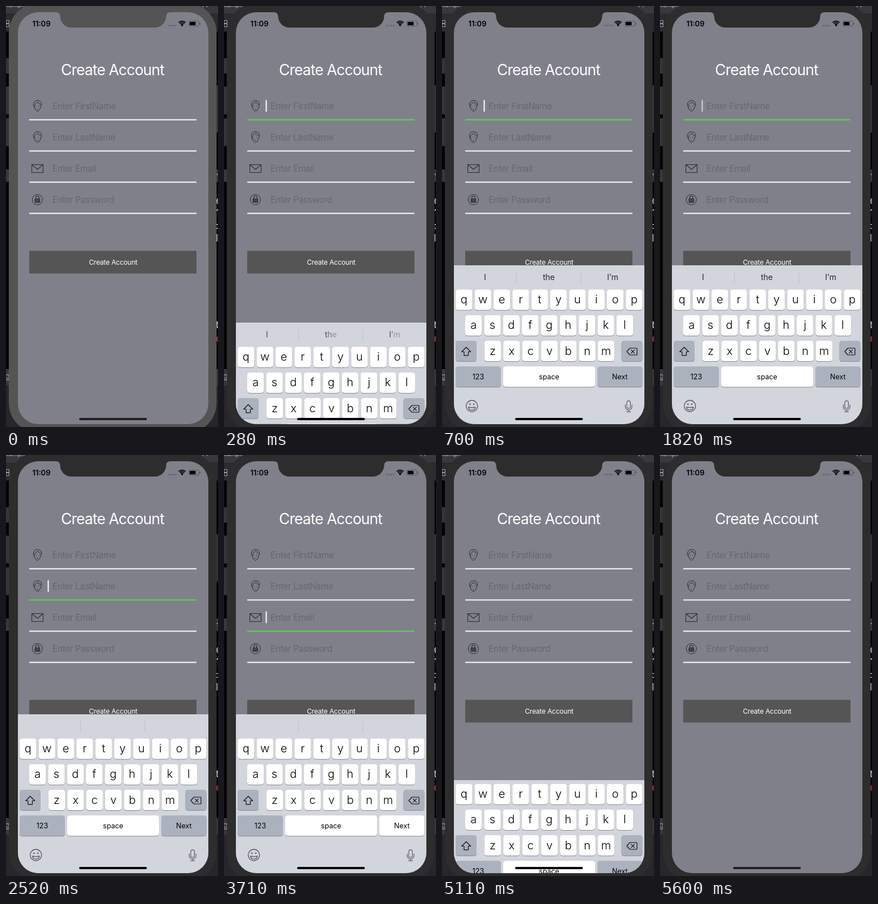
These frames come from a looping animation (374x742 px, 5740 ms). An HTML page with a canvas:

```html
<!DOCTYPE html>
<html lang="en">
<head>
<meta charset="utf-8">
<title>Create Account</title>
<style>
  html, body { margin: 0; width: 100%; height: 100%; overflow: hidden; background: #000; }
  canvas { display: block; width: 374px; height: 742px; }
</style>
</head>
<body>
<canvas id="stage" width="374" height="742"></canvas>
<script>
const ctx = document.getElementById('stage').getContext('2d');
const LOOP = 5740, STEP = 70;
const FONT = 'Inter, Roboto, sans-serif';
const INK = '#2b2b2e', KEY = '#ffffff', KEY_GREY = '#abb2be', PANEL = '#d3d5dd';
const FIELDS = ['Enter FirstName', 'Enter LastName', 'Enter Email', 'Enter Password'];
const clamp = v => Math.max(0, Math.min(1, v));

// Critically damped spring, as used by the system keyboard
function spring(ms) {
  const x = Math.max(0, ms) * 0.01826;
  return 1 - (1 + x) * Math.exp(-x);
}

function rect(x, y, w, h, color) {
  ctx.fillStyle = color;
  ctx.fillRect(x, y, w, h);
}

function round(x, y, w, h, r, color) {
  ctx.beginPath();
  ctx.roundRect(x, y, w, h, r);
  ctx.fillStyle = color;
  ctx.fill();
}

function dot(x, y, r, color) {
  ctx.beginPath();
  ctx.arc(x, y, r, 0, Math.PI * 2);
  ctx.fillStyle = color;
  ctx.fill();
}

function text(str, x, y, size, color, align = 'center', spacing = 0, weight = 400) {
  ctx.font = `${weight} ${size}px ${FONT}`;
  ctx.letterSpacing = spacing + 'px';
  ctx.textAlign = align;
  ctx.fillStyle = color;
  ctx.fillText(str, x, y);
}

function line(d, color, width = 1, dx = 0, dy = 0) {
  ctx.save();
  ctx.translate(dx, dy);
  ctx.strokeStyle = color;
  ctx.lineWidth = width;
  ctx.lineJoin = ctx.lineCap = 'round';
  ctx.stroke(new Path2D(d));
  ctx.restore();
}

function desktop() {
  rect(0, 0, 374, 742, '#020203');
  rect(0, 0, 374, 13, '#39393d');
  rect(0, 13, 374, 32, '#2c2c2f');
  text('xample', -1, 2, 11, '#c8c8c8', 'left');
  text('f P', 346, 2, 11, '#c8c8c8', 'left');
  for (const y of [25, 31]) line('M0 0h5v5h-5z', '#a0a0a0', 1, 0.5, y + 0.5);
  for (const [y, h] of [[92, 27], [142, 49], [198, 49]]) rect(0, y, 6, h, '#353537');
  rect(370, 140, 4, 83, '#353537');
  rect(0, 288, 374, 22, '#38383c');
  rect(0, 640, 374, 29, '#38383c');
  rect(0, 669, 374, 73, '#26262b');
  line('M0 650h5v9h-5M0 654l3 3', '#b8b8b8');
  rect(371, 296, 3, 2, '#39a5c4');
  [['e', 349], ['1', 371], [':', 393], ['l', 415], ['t', 568]].forEach(([c, y]) =>
    text(c, 370, y, 17, '#e6e6e6', 'left'));
  text('e', 370, 592, 17, '#d8434b', 'left');
}

function statusBar() {
  text('11:09', 62.5, 35.6, 13, '#000', 'center', 0, 600);
  for (let i = 0; i < 4; i++) dot(287.5 + i * 4, 34.5, 1.2, '#5c5c64');
  for (const r of [2.8, 5.7, 8.6]) {
    ctx.beginPath();
    ctx.arc(310.7, 35.2, r, -Math.PI * 0.75, -Math.PI * 0.25);
    ctx.lineWidth = 1.9;
    ctx.lineCap = 'butt';
    ctx.strokeStyle = '#000';
    ctx.stroke();
  }
  dot(310.7, 34.2, 1.4, '#000');
  ctx.beginPath();
  ctx.roundRect(322.5, 26.5, 18, 9, 2.5);
  ctx.lineWidth = 1;
  ctx.strokeStyle = '#57575d';
  ctx.stroke();
  round(324, 28, 10.5, 6, 1, '#000');
  round(341.6, 29.3, 1.4, 3.6, 0.7, '#57575d');
}

function face(y) {
  line('M50 3Q47.5 -1 48.5 -4Q50 -9.5 56 -9.5Q62 -9 62.5 -4Q62.5 0 61 3Q59.5 8 55.5 10Q51.5 8 50 3Z' +
       'M49.8 1Q50 -3 53 -4.5Q55 -6 57 -6.5Q58 -3 61.3 -2', INK, 1, 0, y);
  dot(53, y + 0.8, 0.7, INK);
  dot(58, y + 0.8, 0.7, INK);
  line('M54.5 5.8h2', INK, 0.8, 0, y);
}

function envelope(y) {
  line('M45.5 -6.5h20v14h-20zl10 8.5l10 -8.5', INK, 1.1, 0, y);
}

function lock(y) {
  line('M46.2 0a9.1 9.1 0 1 0 18.2 0a9.1 9.1 0 1 0 -18.2 0', INK, 1, 0, y + 0.3);
  line('M52.6 -1.5v-1.8a2.7 2.7 0 0 1 5.4 0v1.8', INK, 1.2, 0, y);
  round(50.5, y - 1.5, 9.6, 7, 1, INK);
  line('M52 0.6h6.6M52 2.9h6.6', '#77777f', 0.8, 0, y);
}

function form(focus, caret) {
  text('Create Account', 188, 121.5, 26.5, '#fff', 'center', -0.95);
  FIELDS.forEach((label, i) => {
    const y = 176 + i * 55;
    [face, face, envelope, lock][i](y);
    text(label, 82, y + 5.8, 15.5, '#67676e', 'left', -0.4);
    rect(41, y + 23.5, 295, 2, i === focus ? '#51dc48' : '#fafafa');
    if (i === focus && caret > 0) {
      ctx.globalAlpha = caret;
      round(73.5, y - 10.5, 2, 21, 1, '#fff');
      ctx.globalAlpha = 1;
    }
  });
  rect(41, 431.5, 295, 40, '#555555');
  text('Create Account', 189, 456, 12, '#fff', 'center', -0.2);
}

function key(x, y, w, color = KEY, label = '', size = 20, weight = 400) {
  round(x, y + 1, w, 36, 4.5, '#898c93');
  round(x, y, w, 36, 4.5, color);
  if (label) text(label, x + w / 2, y + (size > 15 ? 24.5 : 22.3), size, '#000', 'center', 0, weight);
}

function words(t) {
  const out = 1 - clamp((t - 2310) / 210);
  if (out <= 0) return;
  [['I', 76], ['the', 188.5], ['I’m', 301]].forEach(([word, cx]) => {
    ctx.font = `400 14px ${FONT}`;
    ctx.letterSpacing = '0px';
    let x = cx - ctx.measureText(word).width / 2;
    [...word].forEach((ch, i) => {
      ctx.globalAlpha = out * clamp((t - 180) / 130 - i * 0.2);
      text(ch, x, 483, 14, '#26272a', 'left');
      x += ctx.measureText(ch).width;
    });
  });
  ctx.globalAlpha = 1;
}

function keyboard(t, offset, bar, pressed) {
  ctx.save();
  ctx.translate(0, Math.round(offset));
  rect(20, bar ? 457 : 493, 338, 290, PANEL);
  if (bar) {
    rect(131, 469, 1, 20, '#bfc2c9');
    rect(244.5, 469, 1, 20, '#bfc2c9');
    words(t);
  }
  [['qwertyuiop', 24.2], ['asdfghjkl', 41], ['zxcvbnm', 74.8]].forEach(([row, x], r) =>
    [...row].forEach((ch, i) => key(x + i * 33.35, 499.7 + r * 45.2, 29.3, KEY, ch, 20, 300)));
  key(24, 590, 37, KEY_GREY);
  line('M42.7 601.5l8 8h-4.2v6.3h-7.6v-6.3h-4.2z', '#111', 1.2);
  key(316.5, 590, 37, KEY_GREY);
  line('M326 609l5.5 -6h11.5q1 0 1 1v10q0 1 -1 1h-11.5zM333.8 606.2l5.6 5.6m0 -5.6l-5.6 5.6', '#111', 1.2);
  key(24, 635.3, 80, KEY_GREY, '123', 12.5);
  key(108, 635.3, 162, KEY, 'space', 12.5);
  key(274, 635.3, 79.5, pressed ? KEY : KEY_GREY, 'Next', 12.5);

  const grey = '#585b63';
  line('M42.7 705a10 10 0 1 0 20 0a10 10 0 1 0 -20 0M46.5 707q6.2 1.2 12.4 0q-1.2 5.2 -6.2 5.2t-6.2 -5.2', grey, 1.3);
  dot(49.3, 701.8, 1.4, grey);
  dot(56.1, 701.8, 1.4, grey);
  line('M326 699a3.2 3.2 0 0 1 6.4 0v7a3.2 3.2 0 0 1 -6.4 0zM323.3 703v3.2a5.9 5.9 0 0 0 11.8 0v-3.2M329.2 712v3.2m-3.5 0h7', grey, 1.2);
  ctx.restore();
}

function notch(color) {
  ctx.fillStyle = color;
  ctx.fill(new Path2D('M88 10V11Q95 11 95.5 18A20 20 0 0 0 115.5 38H262.5A20 20 0 0 0 282.5 18Q283 11 290 11V10Z'));
}

function focusAt(t) {
  if (t < 140 || t >= 5040) return -1;
  return [2380, 3150, 3850].filter(s => t >= s).length;
}

function caretAt(t) {
  const fade = (from, ms) => clamp((t - from) / ms);
  if (t < 1190) return 1 - fade(700, 210);
  if (t < 1750) return fade(1190, 140);
  if (t < 2240) return 1 - fade(1750, 210);
  return 1 - fade(4410, 210);
}

function draw(t) {
  const bezel = t < 70 ? '#545454' : '#2d2d2d';
  desktop();
  round(5, -5, 366.5, 757, 52, bezel);

  ctx.save();
  ctx.beginPath();
  ctx.roundRect(21, 11, 336, 726, 36);
  ctx.clip();
  rect(20, 10, 338, 728, '#80808a');
  statusBar();
  form(focusAt(t), caretAt(t));

  const closing = t >= 5040;
  const offset = closing ? 244 * spring(t - 5046) : 280 * (1 - spring(t - 161));
  const shown = t > 161 && t < 5530;
  const pressed = [[2240, 2380], [2940, 3150], [3710, 3850], [4970, 5040]]
    .some(([a, b]) => t >= a && t < b);
  if (shown) keyboard(t, offset, !closing, pressed);
  round(129, 726, 119.5, 4, 2, shown ? '#000' : '#202022');
  ctx.restore();
  notch(bezel);
}

const start = performance.now();
function tick() {
  const t = (performance.now() - start) % LOOP;
  draw(Math.floor(t / STEP) * STEP);
  requestAnimationFrame(tick);
}
tick();
</script>
</body>
</html>
```
